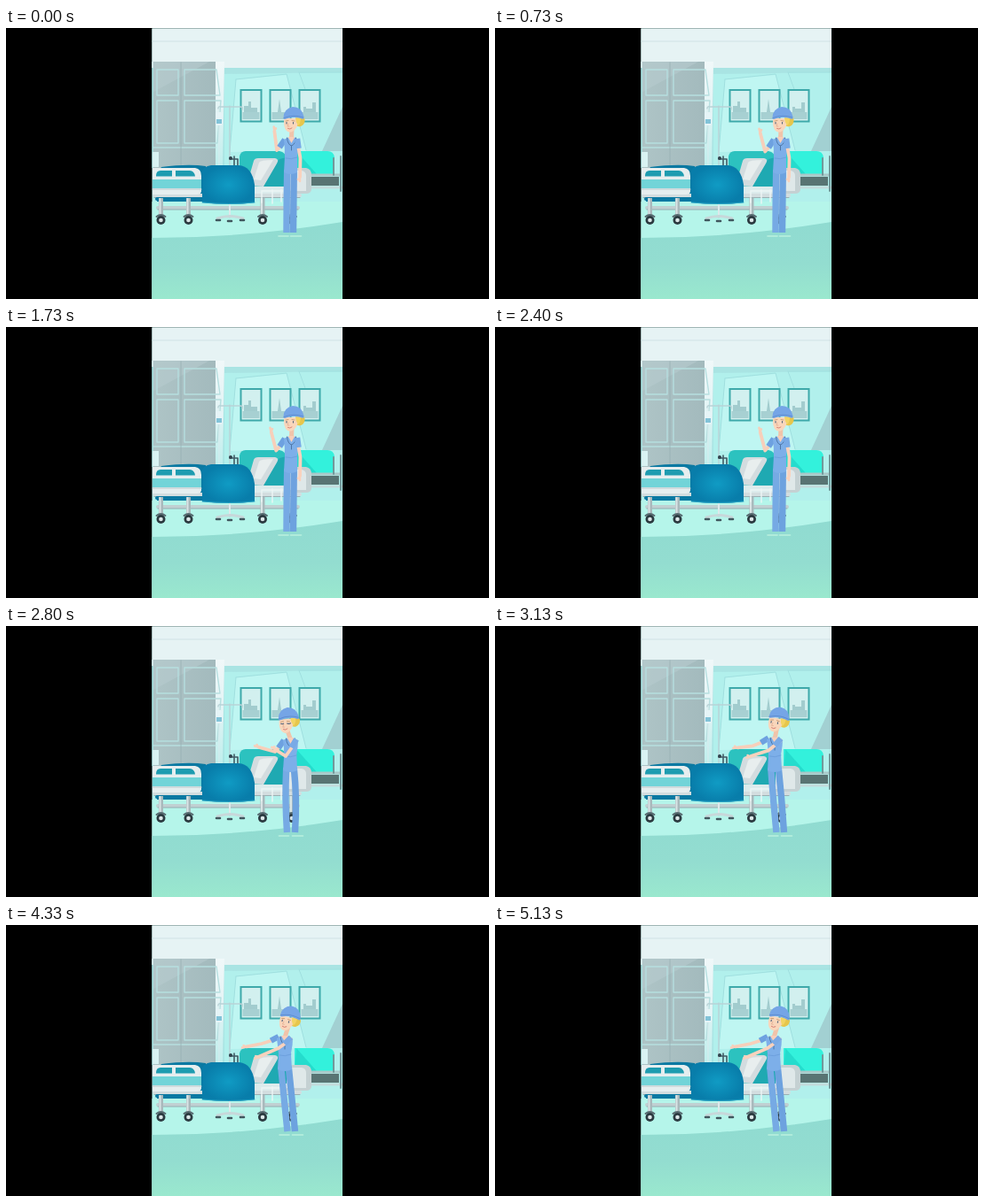
These frames come from a looping animation (544x306 px, 5190 ms). An HTML page:

```html
<!DOCTYPE html>
<html lang="en">
<head>
<meta charset="utf-8">
<title>Hospital ward</title>
<style>
  html, body { margin: 0; width: 100%; height: 100%; overflow: hidden; background: #000; }
  svg { display: block; width: 100%; height: 100%; }
</style>
</head>
<body>
<svg viewBox="0 0 544 306" fill="none" stroke-linecap="round" stroke-linejoin="round">
  <defs>
    <clipPath id="room"><rect x="164.5" y=".5" width="214.5" height="305.5"/></clipPath>
    <linearGradient id="floor" x2="0" y2="1"><stop stop-color="#90dbd1"/><stop offset=".55" stop-color="#93ddd0"/><stop offset="1" stop-color="#9ae8ce"/></linearGradient>
    <linearGradient id="door"><stop stop-color="#aec4c6"/><stop offset="1" stop-color="#a3babd"/></linearGradient>
    <linearGradient id="jamb" x2="0" y2="1"><stop stop-color="#f0f8f9"/><stop offset=".45" stop-color="#e3f4f5"/><stop offset="1" stop-color="#bdeeec"/></linearGradient>
    <radialGradient id="blanket"><stop stop-color="#109bc4"/><stop offset="1" stop-color="#087daa"/></radialGradient>
    <g id="wheel">
      <path d="M0-25V-4" stroke="#a9b9bc" stroke-width="5" stroke-linecap="butt"/>
      <path d="M-1-25V-5" stroke="#d9e4e5" stroke-width="2" stroke-linecap="butt"/>
      <path d="M-5-4Q0-8 5-4" stroke="#566a70" stroke-width="2"/>
      <circle r="5" fill="#2b3a40"/><circle r="2.3" fill="#dce7e8"/>
    </g>
    <g id="frame">
      <rect x="1" y="1" width="23" height="35.5" fill="#d2f0ef" stroke="#3ea9aa" stroke-width="2" stroke-linejoin="miter"/>
      <path d="M3 34V26H22V34Z" fill="#a7d0d2"/>
    </g>
  </defs>

  <g clip-path="url(#room)">
    <rect x="164" width="216" height="306" fill="#b5f2ee"/>
    <path d="M164 38H379V53H246V158H164Z" fill="#a9e4e3"/>
    <path d="M246 52L379 50V196H246Z" fill="#b1f0ec"/>
    <path d="M252 140L259 58L316 53L338 139Z" fill="#bff6f2"/>
    <path d="M259 58L316 52L338 138M252 140L259 58M330 50H379M330 50L337 69" stroke="#a0dfdf"/>
    <path d="M379 89V139H356Z" fill="#a2d0d2"/>
    <rect x="164" width="216" height="45" fill="#e6f3f4"/>
    <path d="M164 15H379" stroke="#d0e2e6"/>
    <path d="M164 38H246V45H164Z" fill="#d9ebed"/>

    <path d="M236 38H246L244 158H236Z" fill="url(#jamb)"/>
    <rect x="166" y="38" width="70" height="120" fill="url(#door)"/>
    <path d="M166 38H229L166 72Z" fill="#b8cdcf" opacity=".55"/>
    <path d="M170 47H194V76H170ZM170 82H194V130H170ZM201 47H237L241 76H201ZM201 82H242L238 130H201ZM166 135H236" stroke="#b6dfe0" stroke-width="1.4"/>
    <path d="M197 39V157" stroke="#97b0b4" stroke-width=".8"/>
    <rect x="165" y="140" width="7" height="17" fill="#d9f3f3"/>

    <use href="#frame" x="263.5" y="69"/>
    <use href="#frame" x="296.5" y="69"/>
    <use href="#frame" x="329.5" y="69"/>
    <path d="M268 95V88H273V83H276V90H283V95ZM306 95L308 80L310 95ZM335 95V89H338V91H345V84H349V95Z" fill="#a2ccce"/>

    <path d="M164 196H379V306H164Z" fill="#b5f5ea"/>
    <path d="M164 237Q270 237 379 219V306H164Z" fill="url(#floor)"/>

    <!-- Second bed -->
    <path d="M325 139H362Q369 139 370 146V165H325Z" fill="#33f1dc"/>
    <path d="M327 139L350 165H325Z" fill="#25dccd"/>
    <path d="M343 166H376" stroke="#a9c8c8" stroke-width="3"/>
    <path d="M342 168H375V178H342Z" fill="#587473"/>
    <path d="M342 180H378" stroke="#c3dcdc" stroke-width="3"/>
    <path d="M377 145V184M369 147V166" stroke="#71999b" stroke-width="2"/>

    <!-- Drip stand -->
    <path d="M252 88V214M239 91Q239 88 242 89H264Q267 89 266 92" stroke="#b9d3d7" stroke-width="1.4"/>
    <path d="M240 92V97M240 110V155" stroke="#d8eaed"/>
    <rect x="236" y="95" width="8" height="15" rx="2" fill="#e6f4f7"/>
    <path d="M237 103H243V108H237Z" fill="#82c3d8"/>

    <!-- Main bed -->
    <path d="M263 178V145Q264 139 270 139H308Q315 140 316 148V181H263Z" fill="#2cc2bf"/>
    <path d="M316 146V179H289L308 148Z" fill="#1fa9b2"/>
    <path d="M271 178L279 150Q280 147 284 147H303Q308 148 305 153L290 179Z" fill="#d3dcdf"/>
    <path d="M279 171L285 152Q286 149 301 149L287 172Z" fill="#e8eeee"/>
    <path d="M252 148H261M257 145V157M261 148V156" stroke="#405b65" stroke-width="1.6"/>
    <circle cx="253" cy="147" r="2" fill="#30434d"/>
    <path d="M278 179H317V188H278Z" fill="#dcebec"/>
    <path d="M170 165L175 157Q205 153 225 156V196H170Z" fill="#0a79a2"/>
    <path d="M316 158H338Q344 159 344 166V183Q343 187 338 187H316Z" fill="#c5d1d3"/>
    <path d="M316 161H333Q338 162 338 167V184H316Z" fill="#dfe8e9"/>
    <path d="M167 189H331" stroke="#d3dddf" stroke-width="4"/>
    <path d="M167 191.5H331" stroke="#9cafb3"/>
    <path d="M171 203H329" stroke="#c0d0d2" stroke-width="4"/>
    <path d="M171 205H329" stroke="#94adb0"/>
    <path d="M170 193H222" stroke="#0a79a2" stroke-width="4"/>
    <use href="#wheel" x="174.5" y="217"/>
    <use href="#wheel" x="205.5" y="217"/>
    <use href="#wheel" x="289" y="217"/>
    <use href="#wheel" x="322" y="217"/>
    <path d="M288 184V197M300 183V198M310 183V196M288 184H312" stroke="#edf6f6" stroke-width="1.4"/>
    <path d="M221 163Q222 156 231 155H262Q277 156 280 177V197Q252 201 221 197Z" fill="url(#blanket)"/>
    <path d="M221 197Q251 200 280 197" stroke="#2aa6c6"/>
    <path d="M165 158H213Q220 159 220 167V184Q220 188 215 188H165Z" fill="#e6eeef"/>
    <path d="M165 171H220V181H165Z" fill="#72d4d8"/>
    <path d="M165 182H220" stroke="#b9cacc" stroke-width="1.2"/>
    <path d="M169 167Q169 161 174 161H187V167.500H169ZM191 161H207Q212 161 213 167.500H191Z" fill="#1e9cb0"/>
    <path d="M252 200V213" stroke="#dce9eb" stroke-width="2"/>
    <path d="M238 215Q252 210 267 215" stroke="#c7d8da" stroke-width="3"/>
    <path d="M237 217H241M250 218H254M264 217H268" stroke="#40575e" stroke-width="2.6"/>

    <!-- Nurse -->
    <path id="shoes" stroke="#baf1df" stroke-width="1.6"/>
    <g stroke-width="7.4" stroke-linecap="butt">
      <path id="legFar" stroke="#6da2df"/>
      <path id="legNear" stroke="#76aae4"/>
    </g>
    <path id="armFar" stroke="#f7cfba" stroke-width="3.8"/>
    <path id="handFar" stroke="#f7cfba" stroke-width="2.6"/>
    <path id="sleeveFar" stroke="#6da1e0" stroke-width="6.500" stroke-linecap="butt"/>
    <path id="neck" stroke="#f0c4aa" stroke-width="5"/>
    <path id="torso" fill="#7dafe9"/>
    <path id="collar" fill="#f7cfba"/>
    <path id="tube" stroke="#4d76a8" stroke-width="1"/>
    <path id="belt" stroke="#6da0de" stroke-width="1"/>
    <path id="armNear" stroke="#f9d2bd" stroke-width="3.8"/>
    <path id="handNear" stroke="#f9d2bd" stroke-width="2.6"/>
    <path id="sleeveNear" stroke="#79aae6" stroke-width="6.500" stroke-linecap="butt"/>
    <g id="head">
      <path d="M6-4Q13-5 14.500-2Q15 4 10 6Q6 7 4 4Z" fill="#e6c64c"/>
      <path d="M-8.500-3Q-10 5-7 10Q-3 15 2 11Q7 7 8-3Z" fill="#f9d6bb"/>
      <path d="M4-4Q4 1 7 5Q10 3 10-4Z" fill="#f2d462"/>
      <path d="M-9.500-4Q-9-14 1-16Q11-16 13.500-5L13-2Q2-6-8-2Q-10-2-9.500-4Z" fill="#75a5e6"/>
      <path d="M-9-3.500Q2-8 13-4" stroke="#5f8fd2"/>
      <path d="M-7 0L-4-.5M0-.5L3 0" stroke="#b98a58" stroke-width=".7"/>
      <path id="eyes" stroke="#4d5f78" stroke-width="1.1"/>
      <path d="M-4 3L-5 6H-3" stroke="#e3ac93" stroke-width=".8"/>
      <path d="M-4.500 8.500Q-2 10 0 8" stroke="#d57b70" stroke-width=".9"/>
    </g>
  </g>
</svg>
<script>
const LOOP = 5190, FRAME = 1000 / 15;
const part = id => document.getElementById(id);
const draw = (id, d) => part(id).setAttribute("d", d);

const greeting = {
  head: [322, 105], tilt: [0], shoulders: [313, 124, 330, 124], hips: [313, 165, 328, 165],
  knees: [316, 324], feet: [316, 231, 323.5, 231],
  far: [314, 128, 304.5, 139, 299.4, 115], near: [328, 127, 331.5, 147, 331, 171]
};
const turning = {
  head: [316.5, 108], tilt: [-3], shoulders: [312, 127, 329, 127], hips: [312, 165, 328, 165],
  knees: [314, 328], feet: [316.5, 233, 325.5, 233],
  far: [313, 131, 303, 142, 282, 136], near: [327, 130, 315, 147, 301, 138]
};
const showing = {
  head: [317.5, 107], tilt: [12], shoulders: [305, 126, 323, 126], hips: [306, 165, 322, 165],
  knees: [313, 322], feet: [317, 233, 325.5, 233],
  far: [307, 128, 288, 134, 268, 138], near: [321, 129, 307, 139, 282, 150]
};

const progress = (t, from, to) => Math.min(1, Math.max(0, (t - from) / (to - from)));

function blend(a, b, u) {
  const pose = {};
  for (const key in a) pose[key] = a[key].map((v, i) => v + (b[key][i] - v) * u);
  return pose;
}

function poseAt(t) {
  if (t >= 2800) return blend(turning, showing, 1 - (1 - progress(t, 2800, 3450)) ** 2.5);
  const turn = progress(t, 2440, 2800) ** 1.6;
  const pose = blend(greeting, turning, turn);
  const swing = Math.cos((t / 1000 - .065) * 2 * Math.PI) * (1 - turn);
  pose.far[2] += .6 * swing;
  pose.far[3] -= swing;
  pose.far[4] += 2.8 * swing;
  pose.far[5] -= 1.5 * swing;
  return pose;
}

function arm(side, [sx, sy, ex, ey, hx, hy]) {
  const dx = hx - ex, dy = hy - ey, len = Math.hypot(dx, dy);
  const ux = dx / len, uy = dy / len;
  const reach = Math.min(1, 9 / Math.hypot(ex - sx, ey - sy));
  draw("arm" + side, `M${sx} ${sy}L${ex} ${ey}L${hx - ux * 3} ${hy - uy * 3}`);
  draw("hand" + side, `M${hx - ux * 4} ${hy - uy * 4}L${hx + ux * 2} ${hy + uy * 2}M${hx - ux * 2} ${hy - uy * 2}l${ux * 2 - uy * 2} ${uy * 2 + ux * 2}`);
  draw("sleeve" + side, `M${sx} ${sy - 2}L${sx + (ex - sx) * reach} ${sy + (ey - sy) * reach}`);
}

function render(t) {
  const p = poseAt(t);
  const [lx, ly, rx, ry] = p.shoulders, [hl, hy, hr] = p.hips, [fl, fy, fr] = p.feet;
  const [kl, kr] = p.knees;
  const mid = (lx + rx) / 2, hip = (hl + hr) / 2, waist = (mid + hip) / 2;
  draw("shoes", `M${fl - 9} ${fy + 4}H${fl + 2}M${fr - 3} ${fy + 4}H${fr + 9}`);
  draw("legFar", `M${hr - 3.7} ${hy - 5}Q${kr} 195 ${fr} ${fy}`);
  draw("legNear", `M${hl + 3.7} ${hy - 5}Q${kl} 195 ${fl} ${fy}`);
  draw("torso", `M${lx} ${ly + 2}Q${mid} ${ly - 4} ${rx} ${ry + 2}Q${rx} 136 ${waist + 7} 145L${hr} ${hy - 2}Q${hip} ${hy + 2} ${hl} ${hy - 2}L${waist - 7} 145Q${lx + 1} 136 ${lx} ${ly + 2}Z`);
  draw("collar", `M${mid - 4} ${ly - 1}H${mid + 4}L${mid} ${ly + 6}Z`);
  draw("tube", `M${mid - 5} ${ly}Q${mid - 4} ${ly + 8} ${mid} ${ly + 9}Q${mid + 5} ${ly + 7} ${mid + 5} ${ly}M${mid} ${ly + 9}v5`);
  draw("belt", `M${waist - 6} 147Q${waist} 149 ${waist + 7} 146`);
  draw("neck", `M${p.head[0]} ${p.head[1] + 9}L${mid} ${ly + 1}`);
  arm("Far", p.far);
  arm("Near", p.near);
  part("head").setAttribute("transform", `translate(${p.head}) rotate(${p.tilt})`);
  const blink = t >= 2660 && t < 2930;
  draw("eyes", blink ? "M-7 2Q-5 3-4 2M0 2Q2 3 4 2" : "M-6 1.5V3M1.5 1.5V3");
}

const start = performance.now();
function tick() {
  const t = (performance.now() - start) % LOOP;
  render(Math.floor((t + 3.5) / FRAME) * FRAME);
  requestAnimationFrame(tick);
}
tick();
</script>
</body>
</html>
```
